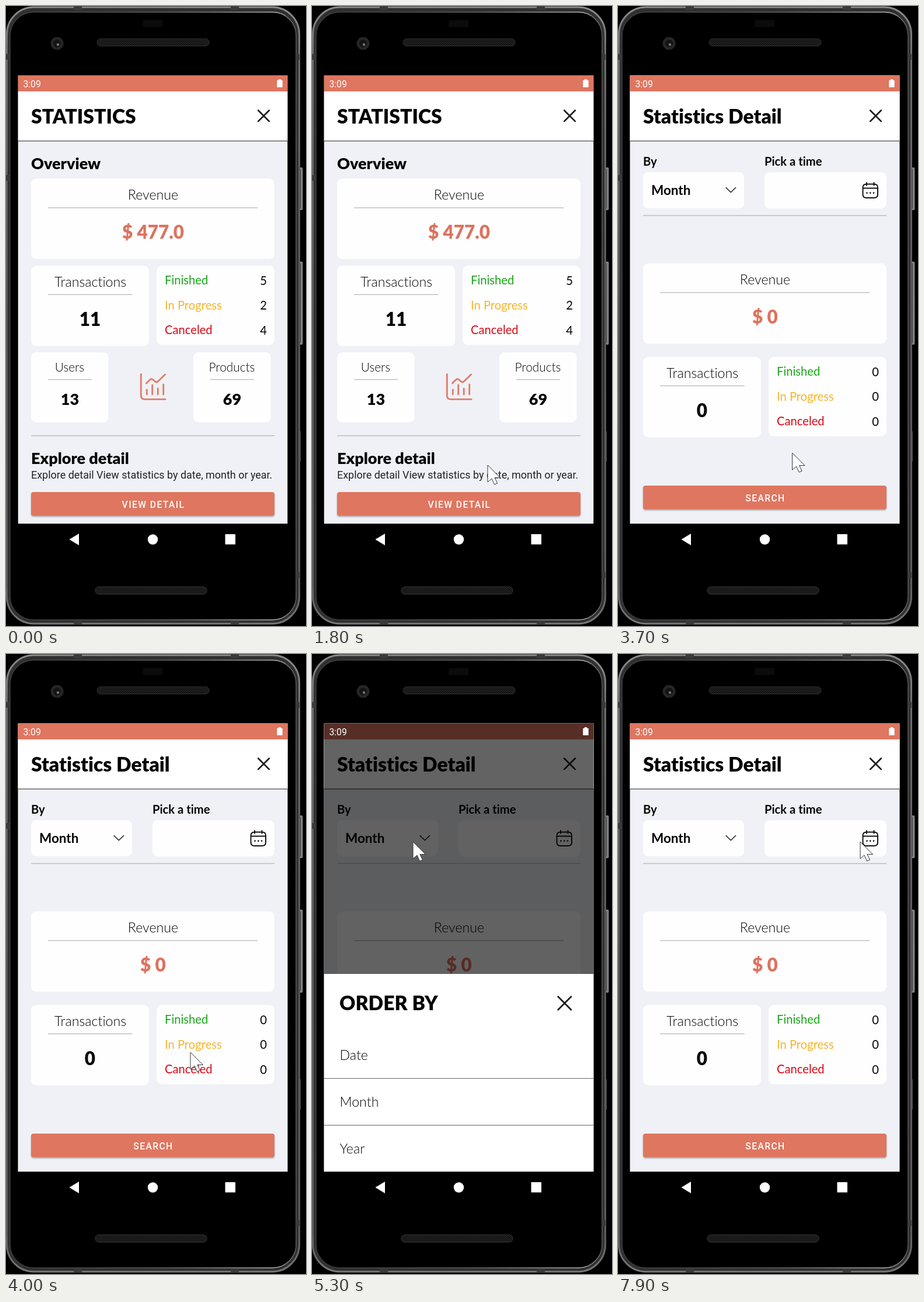
These frames come from a looping animation (514 by 1060 pixels, 8 s). An HTML page:

```html
<!DOCTYPE html>
<html lang="en">
<head>
<meta charset="utf-8">
<title>Statistics screen</title>
<style>
html, body { margin: 0; width: 100%; height: 100%; overflow: hidden; background: #000; }
svg { display: block; width: 100%; height: 100%; }
text { font-family: Lato, sans-serif; font-size: 20.2px; fill: #050505; white-space: pre; font-variant-ligatures: none; }
.mid { text-anchor: middle; }
.light { font-weight: 300; font-size: 20.8px; }
.bold { font-weight: 700; }
.black { font-weight: 900; }
.label { font-size: 22.5px; }
.light.label { font-size: 23.2px; }
.head { font-size: 27px; }
.sum { font-size: 31.5px; }
.title { font-size: 33.7px; }
.money { fill: #dc7360; }
.robo { font-family: Roboto, sans-serif; }
.button { font-size: 15.7px; font-weight: 500; letter-spacing: .089em; fill: #fff; }
.line { fill: none; stroke-linecap: round; stroke-linejoin: round; }
</style>
</head>
<body>
<svg viewBox="0 0 514 1060" preserveAspectRatio="none">
  <defs>
    <linearGradient id="rim" x2="0" y2="1">
      <stop offset="0" stop-color="#8a8a8a"/><stop offset=".08" stop-color="#6c6c6c"/>
      <stop offset=".5" stop-color="#565656"/><stop offset=".94" stop-color="#5c5c5c"/>
      <stop offset="1" stop-color="#777"/>
    </linearGradient>
    <linearGradient id="glint" x2="1" y2="0">
      <stop offset="0" stop-color="#3a3a3a"/><stop offset=".55" stop-color="#666"/>
      <stop offset=".93" stop-color="#b5b5b5"/><stop offset="1" stop-color="#555"/>
    </linearGradient>
    <pattern id="mesh" width="4" height="4" patternUnits="userSpaceOnUse">
      <rect width="4" height="4" fill="#202020"/>
      <path d="M0 0L4 4M4 0L0 4" stroke="#111" stroke-width=".8"/>
    </pattern>
    <clipPath id="screen"><rect x="20.7" y="118.7" width="461.6" height="766.3"/></clipPath>
    <filter id="drop" x="-5%" y="-20%" width="110%" height="160%">
      <feDropShadow dx="0" dy="1.6" stdDeviation="1.3" flood-opacity=".35"/>
    </filter>
  </defs>
  <g id="phone"></g>
  <g clip-path="url(#screen)">
    <g id="stats"></g>
    <g id="detail"></g>
    <rect id="dim" x="20" y="118" width="463" height="768"/>
    <g id="status"></g>
    <g id="sheet"></g>
  </g>
  <path id="cursor" d="M0 0V29L7 23L11.5 33L16.5 31L12 21.5H21.5Z" fill="#fff" stroke="#333" stroke-width="1" stroke-linejoin="round"/>
</svg>
<script>
const LOOP = 8000, CORAL = '#df7660', BG = '#eff1f6';
const $ = id => document.getElementById(id);

const rect = (x, y, w, h, fill, r = 0, extra = '') =>
  `<rect x="${x}" y="${y}" width="${w}" height="${h}" rx="${r}" fill="${fill}" ${extra}/>`;
const text = (x, y, s, cls = '', extra = '') => `<text x="${x}" y="${y}" class="${cls}" ${extra}>${s}</text>`;
const path = (d, color, w) => `<path class="line" d="${d}" stroke="${color}" stroke-width="${w}"/>`;
const rule = (x, y, w, color = '#b3b3b3') => rect(x, y, w, 1.2, color);
const card = (x, y, w, h) => rect(x, y, w, h, '#fefefe', 9);
const cross = (x, y, r) => path(`M${x - r} ${y - r}L${x + r} ${y + r}M${x + r} ${y - r}L${x - r} ${y + r}`, '#1c1c1c', 2.7);
const button = (y, s, id = '') =>
  rect(43, y, 417, 40.5, CORAL, 4, `id="${id}" filter="url(#drop)"`) + text(252.5, y + 26.5, s, 'robo button mid');

const page = title => rect(20, 118, 463, 768, BG) + rect(20, 118, 463, 28, CORAL) +
  rect(20, 146, 463, 84.5, '#fff') + rule(20, 230.2, 463, '#444') +
  text(43, 201, title, 'black title') + cross(441.5, 187.8, 9.3);

const revenue = (y, s) => card(43, y, 417, 137.5) + text(252, y + 36, 'Revenue', 'light label mid') +
  rule(72, y + 49.4, 359) + text(252, y + 103, s, 'black sum money mid');

const transactions = (y, total, counts) => {
  const rows = [['Finished', '#1aa51a'], ['In Progress', '#f5b52e'], ['Canceled', '#dc0714']];
  return card(43, y, 202, 137.5) + text(144.5, y + 35.5, 'Transactions', 'light label mid') +
    rule(72, y + 48.8, 144.5) + text(144, y + 102.5, total, 'black sum mid') +
    card(258, y, 202, 135.5) + rows.map(([name, color], i) =>
      text(272, y + 32 + i * 42.6, name, '', `style="fill:${color}"`) +
      text(441, y + 32.5 + i * 42.6, counts[i], 'mid')).join('');
};

const small = (x, name, n) => card(x, 592, 132.5, 120) + text(x + 66, 625, name, 'light mid') +
  rule(x + 29, 638, 75) + text(x + 66.5, 682, n, 'black head mid');

const chart = path('M231.3 629.5V666Q231.3 672.4 237.7 672.4H273', '#e07d69', 2.9) +
  path('M241.3 656V664M250.7 648V664M260.2 654V664M269.7 647V664', '#e07d69', 2.9) +
  path('M240.5 645L246.5 639Q249 636.5 252 639L255.5 642Q258.2 644 260.7 641.5L272.5 630', '#e07d69', 2.9);

const calendar = path('M425.5 304.5H439Q445 304.5 445 310.5V322Q445 328 439 328H425.5Q419.5 328 419.5 322V310.5Q419.5 304.5 425.5 304.5ZM419.5 311.5H445M426 302V306.5M438.5 302V306.5', '#111', 2) +
  path('M426.5 319.6h.01M432.3 319.6h.01M438 319.6h.01', '#111', 2.8);

const sideKey = (y, h) => rect(502, y, 6.5, h, '#808080', 2) + rect(503, y + 3, 2, h - 6, '#444', 1);

$('phone').innerHTML =
  rect(0, 0, 514, 1060, '#000') +
  sideKey(276, 73) + sideKey(437, 142) + rect(502, 727, 3, 52, '#4a4a4a', 1) +
  rect(1.5, 2, 501, 1054, '#303030', 46, 'stroke="url(#rim)" stroke-width="3"') +
  rect(7, 10.5, 490, 1039, '#000', 40, 'stroke="url(#glint)" stroke-width="1.6"') +
  [[0, 82], [0, 289], [497, 82], [497, 968]].map(([x, y]) => rect(x, y, 6, 10, '#3a3a3a')).join('') +
  [[116, 1], [385, 1], [116, 1051], [385, 1051]].map(([x, y]) => rect(x, y, 14, 6, '#3a3a3a')).join('') +
  rect(234, 24, 34, 12, '#0b0b0b', 3) +
  rect(156, 56, 192, 12.5, 'url(#mesh)', 6, 'stroke="#2c2c2c"') +
  rect(153, 993, 191, 12.5, 'url(#mesh)', 6, 'stroke="#3a3836"') +
  '<circle cx="87.5" cy="64" r="11" fill="#262626"/><circle cx="87.5" cy="64" r="6.5" fill="#141414"/>' +
  '<circle cx="89" cy="66" r="2.2" fill="#777"/>' +
  '<path d="M108.5 912L125 902V922Z" fill="#fff"/><circle cx="251.5" cy="912" r="8.7" fill="#fff"/>' +
  rect(375.5, 903, 17.5, 17.5, '#fff');

$('stats').innerHTML = page('STATISTICS') +
  text(43, 279, 'Overview', 'black head') + revenue(295, '$ 477.0') +
  transactions(444, '11', [5, 2, 4]) + small(43, 'Users', 13) + small(321, 'Products', 69) + chart +
  rule(43, 734, 417) + text(43, 783, 'Explore detail', 'black head') +
  text(43, 808, 'Explore detail View statistics by date, month or year.', 'robo', 'style="font-size:17.95px;fill:#222"') +
  button(831, 'VIEW DETAIL', 'view');

$('detail').innerHTML = page('Statistics Detail') +
  text(43, 273, 'By', 'bold') + text(251, 273, 'Pick a time', 'bold') +
  card(43, 284, 173, 62) + text(57, 323, 'Month', 'bold label') +
  path('M185 310.5L193.3 318.5L201.6 310.5', '#222', 1.6) +
  card(251, 284, 209, 62.5) + calendar + rule(43, 357.6, 417) +
  revenue(440, '$ 0') + transactions(600, '0', [0, 0, 0]) + button(820, 'SEARCH');

$('status').innerHTML = text(29.5, 138.5, '3:09', 'robo', 'style="font-size:15.7px;fill:#fff"') +
  '<path d="M466.7 125.3H471.3V127H473.7V139H464.3V127H466.7Z" fill="#fff"/>';

$('sheet').innerHTML = rect(20, 547, 463, 339, '#fff') +
  text(47, 608.5, 'ORDER BY', 'black title') + cross(432.8, 597, 11.2) +
  ['Date', 'Month', 'Year'].map((s, i) => text(47.5, 694 + i * 80, s, 'light label')).join('') +
  rule(20, 725, 463, '#777') + rule(20, 805, 463, '#777');

const clamp = v => Math.min(1, Math.max(0, v));
const smooth = v => v * v * (3 - 2 * v);
const ramp = (t, a, b) => smooth(clamp((t - a) / (b - a)));

// Pointer stops: time, x, y
const stops = [
  [200, 516, 400], [1000, 350, 515], [1800, 301, 785], [2600, 281, 848], [3400, 281, 848],
  [4000, 316, 681], [4600, 173, 321], [5600, 173, 321], [6300, 395, 324], [7000, 415, 321], [8000, 415, 321]
];

function pointer(t) {
  if (t < stops[0][0]) return [560, 400];
  const i = stops.findIndex(s => s[0] > t);
  const [t0, x0, y0] = stops[i - 1], [t1, x1, y1] = stops[i];
  const k = ramp(t, t0, t1);
  return [x0 + (x1 - x0) * k, y0 + (y1 - y0) * k];
}

function render(t) {
  const open = ramp(t, 3200, 3400);
  $('detail').setAttribute('opacity', open);
  $('detail').setAttribute('transform', `translate(0 ${30 * (1 - open)})`);
  $('view').setAttribute('fill', t >= 2800 && t < 3400 ? '#e28977' : CORAL);
  const up = ramp(t, 4850, 5150) * (1 - ramp(t, 5500, 5750));
  $('dim').setAttribute('opacity', .61 * up);
  $('sheet').setAttribute('transform', `translate(0 ${340 * (1 - up)})`);
  $('cursor').setAttribute('transform', `translate(${pointer(t)})`);
}

function tick() {
  render(performance.now() % LOOP);
  requestAnimationFrame(tick);
}
tick();
</script>
</body>
</html>
```
